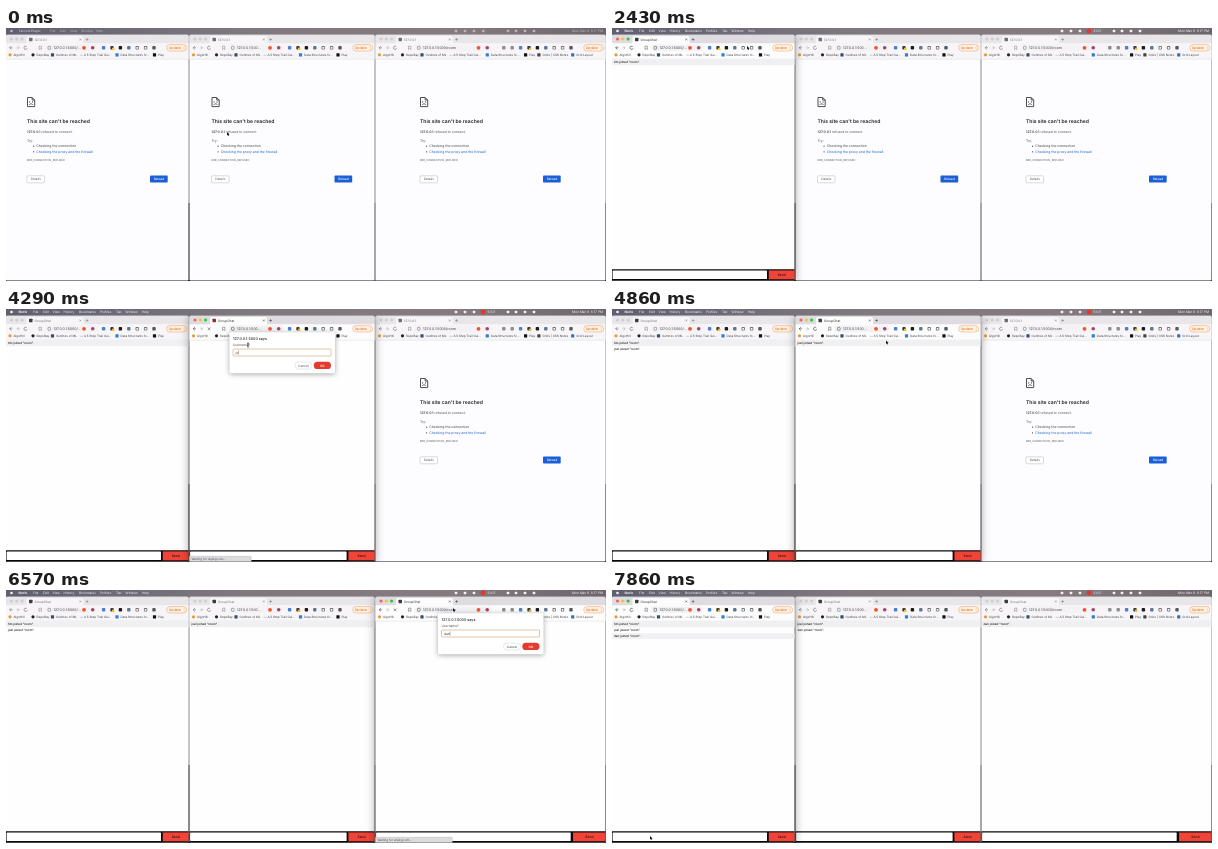
Recreate the animation shown at these times as an HTML page with a canvas. Size 600 by 253 pixels, loop 8000 ms.

```html
<!DOCTYPE html>
<html lang="en">
<head>
<meta charset="utf-8">
<title>Group chat demo</title>
<style>
html, body { margin: 0; width: 100%; height: 100%; overflow: hidden; background: #fff; }
canvas { display: block; width: 600px; height: 253px; }
</style>
</head>
<body>
<canvas id="stage"></canvas>
<script>
const W = 600, H = 253, LOOP = 8000, STEPS = 56, TOP = 6.4, BOTTOM = 252.4;
const SANS = 'Inter, "Liberation Sans", sans-serif';
const canvas = document.getElementById('stage');
const ctx = canvas.getContext('2d');
const scale = window.devicePixelRatio || 1;
canvas.width = Math.round(W * scale);
canvas.height = Math.round(H * scale);
// Keeps fractional glyph spacing in very small type.
ctx.textRendering = 'geometricPrecision';

// All event times are counted in steps of one loop.
const windows = [
  { x: 0, r: 182.5, page: 21, url: '127.0.0.1:5000/...', name: 'tim', busy: '#3a3d40',
    chat: 5, ask: 6, type: 10, join: 14, select: [-1, -1], marks: 6, tools: 7 },
  { x: 183.5, r: 368.5, page: 205.5, url: '127.0.0.1:500...', name: 'joel', busy: '#8d2e2a',
    chat: 26, ask: 27, type: 29, join: 33, select: [20, 25], marks: 6, tools: 7 },
  { x: 369.5, r: 599.5, page: 414, url: '127.0.0.1:5000/room', name: 'dan', busy: '#3a3d40',
    chat: 42, ask: 43, type: 44, join: 48, select: [37, 41], marks: 8, tools: 9 }
];
const focus = [[0, -1], [3, 0], [18, 1], [35, 2], [50, 0]];
const pointer = [
  [0, 221, 104], [2, 221, 104], [6, 20, 18], [15, 20, 18], [19, 250, 18],
  [26, 250, 18], [28, 242, 34], [33, 242, 34], [37, 447, 18], [47, 447, 18], [53, 38, 246]
];
const bookmarks = [
  [4, '#e79a32', 'AlgoHill'], [27, '#222', 'RepoBay'], [46.5, '#34506b', 'Outlines of ML'],
  [74, '', '— A 5 Step Trail Gui...'], [111, '#2f7fd0', 'Data Structures fo...'],
  [148.5, '#111', 'Play'], [161, '#444', 'Grids | CSS Notes'], [194, '#3b6fb5', 'Grid Layout']
];
// Toolbar button colours, from the right edge inwards.
const toolColors = ['#55585c', '#6f7276', '#6f7276', '#5c7690', '#1b1b1b', '#3c3c3c',
  '#4b7fd6', '#8a8d91', '#8a8d91'];

function box(x, y, w, h, fill, radius = 0, stroke) {
  ctx.beginPath();
  ctx.roundRect(x, y, w, h, radius);
  if (fill) { ctx.fillStyle = fill; ctx.fill(); }
  if (stroke) { ctx.strokeStyle = stroke; ctx.lineWidth = 0.5; ctx.stroke(); }
}

function shadowBox(x, y, w, h, fill, radius, blur, alpha) {
  ctx.save();
  ctx.shadowColor = `rgba(0,0,0,${alpha})`;
  ctx.shadowBlur = blur * scale;
  ctx.shadowOffsetY = scale;
  box(x, y, w, h, fill, radius);
  ctx.restore();
}

function dot(x, y, r, fill) {
  ctx.fillStyle = fill;
  ctx.beginPath();
  ctx.arc(x, y, r, 0, 7);
  ctx.fill();
}

function path(points, color, width = 0.6) {
  ctx.strokeStyle = color;
  ctx.lineWidth = width;
  ctx.beginPath();
  points.forEach(([x, y], i) => i ? ctx.lineTo(x, y) : ctx.moveTo(x, y));
  ctx.stroke();
}

function text(str, x, y, size, color = '#333', weight = 400, align = 'left') {
  ctx.font = `${weight} ${size}px ${SANS}`;
  ctx.fillStyle = color;
  ctx.textAlign = align;
  ctx.fillText(str, x, y);
}

function cross(x, y, r, color) {
  path([[x - r, y - r], [x + r, y + r]], color, 0.5);
  path([[x - r, y + r], [x + r, y - r]], color, 0.5);
}

function menuBar(n) {
  const g = ctx.createLinearGradient(0, 0, W, 0);
  g.addColorStop(0, '#5f5f70');
  g.addColorStop(0.4, '#80787f');
  g.addColorStop(0.75, '#857b7f');
  g.addColorStop(1, '#6c656d');
  box(0, 0, W, TOP, g);
  const app = n >= 3;
  const color = app ? '#f6f3f4' : '#bdb5b8';
  dot(5.5, 3, 1.3, color);
  if (app) {
    text('Norlo', 12.5, 4.3, 3.3, color, 700);
    const items = [['File', 27], ['Edit', 37], ['View', 46.5], ['History', 57.5],
      ['Bookmarks', 73], ['Profiles', 94], ['Tab', 110], ['Window', 119.5], ['Help', 136]];
    items.forEach(([s, x]) => text(s, x, 4.3, 3.2, color));
  } else {
    text('Tarnvid Player', 12.5, 4.3, 3.2, color, 700);
    ['File', 'Edit', 'View', 'Window', 'Help'].forEach((s, i) =>
      text(s, [44, 54, 64, 75, 90][i], 4.3, 3.2, color));
  }
  for (const x of [450, 459, 468, 502, 510, 519, 528]) box(x - 1.3, 1.7, 2.6, 2.6, color, 0.8);
  if (app) {
    dot(477, 3, 2.4, '#e3362e');
    text('51:07', 481.5, 4.3, 3.2, color);
  } else {
    box(476, 1.7, 2.6, 2.6, color, 0.8);
  }
  text('Mon Mar 8  6:17 PM', 597, 4.3, 3.3, color, 400, 'right');
}

function tabStrip(w, n, active, loading) {
  const { x, r } = w;
  const ink = active ? '#333' : '#70747a';
  const loaded = n >= w.chat;
  box(x, TOP, r - x, 15.5 - TOP, active ? '#dedce0' : '#e8e6e9', [2, 2, 0, 0]);
  ['#fe5f57', '#febc2e', '#28c840'].forEach((c, i) =>
    dot(x + 5.5 + i * 5.3, 11, 1.6, active ? c : '#cfcdd1'));
  box(x + 20.5, 8, 57, 8, active ? '#fdfcfd' : '#f7f5f8', [2, 2, 0, 0]);
  const icon = loading ? w.busy : '#3a3d40';
  box(x + 23, 9.7, 3.5, 3.5, loaded ? icon : '#6e7277', 0.6);
  text(loaded ? 'GroupChat' : '127.0.0.1', x + 28.5, 12.7, 3.2, ink);
  cross(x + 74.3, 11.5, 0.9, ink);
  path([[x + 79.7, 11.5], [x + 82.5, 11.5]], ink, 0.5);
  path([[x + 81.1, 10.1], [x + 81.1, 12.9]], ink, 0.5);
}

function toolbar(w, n, active, loading) {
  const { x, r } = w;
  const ink = active ? '#333' : '#5f6368';
  box(x, 15.5, r - x, 15.7, active ? '#fdfcfd' : '#f7f5f8');
  path([[x + 5.3, 18.2], [x + 3.7, 19.8], [x + 5.3, 21.4]], ink);
  path([[x + 3.7, 19.8], [x + 6.5, 19.8]], ink, 0.5);
  path([[x + 11.6, 18.2], [x + 13.2, 19.8], [x + 11.6, 21.4]], '#a9acb0');
  path([[x + 10.4, 19.8], [x + 13.2, 19.8]], '#a9acb0', 0.5);
  if (loading) cross(x + 19.6, 19.8, 1.3, ink);
  else {
    ctx.strokeStyle = ink;
    ctx.lineWidth = 0.6;
    ctx.beginPath();
    ctx.arc(x + 19.6, 19.8, 1.6, 0.3, 5.5);
    ctx.stroke();
  }
  path([[x + 33, 18.2], [x + 33, 21.5], [x + 34.2, 20.5], [x + 35.4, 21.5],
    [x + 35.4, 18.2], [x + 33, 18.2]], ink, 0.4);

  const barEnd = w.marks > 6 ? 485 : r - 92;
  box(x + 39.5, 16.6, barEnd - x - 39.5, 6.5, active ? '#f2f1f3' : '#f4f2f5', 1.5);
  const selected = n >= w.select[0] && n < w.select[1];
  ctx.font = `400 3.5px ${SANS}`;
  if (selected) box(x + 47, 17.3, ctx.measureText(w.url).width + 1, 5, '#b9d3ae');
  box(x + 42, 18.3, 2.6, 3, '', 0.6, ink);
  text(w.url, x + 47.5, 21.1, 3.5, selected ? '#183b18' : '#36393d');
  dot(barEnd - 12.5, 19.8, 1.9, '#f0532d');
  dot(barEnd - 3.8, 19.8, 1.8, '#a34468');

  toolColors.slice(0, w.tools).forEach((c, i) => {
    const tx = r - 34.5 - i * 8.4;
    box(tx - 1.7, 18.1, 3.4, 3.4, c, 0.8);
    if (c === '#3c3c3c') box(tx, 19.8, 2.4, 2.3, '#f2c02e', 0.3);
    if (c === '#6f7276') box(tx - 0.9, 18.9, 1.8, 1.8, '#fff', 0.5);
  });
  box(r - 21.8, 16.6, 20, 6.4, '#fff3e7', 3.2, '#f09b55');
  text('Update', r - 19.8, 21, 3.5, '#df7820', 500);
  [18.5, 19.8, 21.1].forEach(y => dot(r - 4.4, y, 0.35, '#df7820'));

  bookmarks.slice(0, w.marks).forEach(([bx, color, label], i) => {
    const px = x + bx + (w.marks > 6 ? Math.max(0, i - 3) * 0.8 : 0);
    if (color) i < 2 ? dot(px, 26.8, 1.6, color) : box(px - 1.6, 25.2, 3.2, 3.2, color, 0.5);
    text(label, px + (color ? 3.5 : 0), 27.9, 3.05, '#3f4246');
  });
  path([[x, 31.2], [r, 31.2]], '#d9d7db', 0.5);
}

function sadPage(x, y) {
  const c = '#4c4f53';
  path([[x + 5.2, y + 0.5], [x + 0.5, y + 0.5], [x + 0.5, y + 9.6], [x + 7.7, y + 9.6],
    [x + 7.7, y + 3], [x + 5.2, y + 0.5], [x + 5.2, y + 3], [x + 7.7, y + 3]], c, 1);
  dot(x + 2.6, y + 4.9, 0.6, c);
  dot(x + 5.5, y + 4.9, 0.6, c);
  path([[x + 2.2, y + 7.9], [x + 3.1, y + 6.9], [x + 5.1, y + 6.9], [x + 6, y + 7.9]], c, 0.8);
}

function errorPage(x) {
  sadPage(x, 69);
  text("This site can't be reached", x, 95.4, 5.05, '#202124', 600);
  text('127.0.0.1', x, 104.7, 3.4, '#3c4043', 600);
  const hostWidth = ctx.measureText('127.0.0.1').width;
  text(' refused to connect.', x + hostWidth, 104.7, 3.4, '#4c5054');
  text('Try:', x, 113.8, 3.4, '#4c5054');
  dot(x + 6.6, 118.2, 0.6, '#3c4043');
  dot(x + 6.6, 123.8, 0.6, '#3c4043');
  text('Checking the connection', x + 9.2, 119.4, 3.4, '#3c4043');
  text('Checking the proxy and the firewall', x + 9.2, 125, 3.4, '#1a62d6');
  text('ERR_CONNECTION_REFUSED', x, 133.3, 2.7, '#5a5e63');
  box(x, 147.8, 17.5, 7, '#fff', 0.8, '#b4b7bb');
  text('Details', x + 8.75, 152.4, 3.2, '#4c5054', 400, 'center');
  box(x + 123, 147.6, 17.7, 7, '#1a5fd6', 0.8);
  text('Reload', x + 131.9, 152.3, 3.2, '#fff', 500, 'center');
}

function chatPage(w, n) {
  const width = w.r - w.x;
  windows.filter(o => o.join >= w.join && n >= o.join).forEach((o, i) => {
    const y = 31.4 + i * 5.9;
    if (i % 2 === 0) box(w.x, y, width, 5.9, '#f0eff1');
    text(`${o.name} joined "room".`, w.x + 2, y + 3.9, 3, '#151515', 500);
  });
  box(w.x, 241.3, width, BOTTOM - 241.3, '#080808');
  box(w.x + 0.6, 242.6, width * 0.846, 8.4, '#fff', 0.6);
  box(w.x + width * 0.859, 242.4, width * 0.141, 8.9, '#f04438');
  text('Send', w.x + width * 0.93, 248, 3.3, '#2a0c0a', 500, 'center');
}

function prompt(w, n) {
  if (n > w.chat && n < w.join) {
    box(w.x, 247.3, (w.r - w.x) / 3, 5.1, '#dcdbde', [0, 1, 0, 0], '#b9b8bb');
    text('Waiting for unpkg.com...', w.x + 2, 251, 3, '#4a4d50');
  }
  const x = (w.x + w.r) / 2 - 52.5;
  shadowBox(x, 23.3, 105.5, 41, '#fff', 1.5, 5, 0.35);
  text('127.0.0.1:5000 says', x + 3.5, 30.6, 3.7, '#202124', 500);
  text('Username?', x + 3.5, 37.1, 3.2, '#44484c');
  box(x + 3.5, 40, 98, 7, '#fff', 0.8, '#c58a52');
  const typed = w.name.slice(0, Math.max(0, n - w.type + 1));
  text(typed, x + 6, 44.7, 3.2, '#333');
  const caret = x + 6.3 + ctx.measureText(typed).width;
  path([[caret, 41.5], [caret, 45.5]], '#333', 0.4);
  box(x + 65.5, 53, 17, 7, '#fff', 3.5, '#cfd1d4');
  text('Cancel', x + 74, 57.6, 3.1, '#55595d', 500, 'center');
  box(x + 84.3, 52.8, 17.2, 7.3, '#e33b2d', 3.65);
  text('OK', x + 92.9, 57.6, 3.1, '#fff', 600, 'center');
}

function drawWindow(w, n, active) {
  const loaded = n >= w.chat;
  const loading = n >= w.chat - 1 && n < w.join;
  const page = loaded ? '#fefefe' : '#fdfcfe';
  shadowBox(w.x, TOP, w.r - w.x, BOTTOM - TOP, page, [2, 2, 1, 1], active ? 10 : 0, active ? 0.4 : 0);
  tabStrip(w, n, active, loading);
  toolbar(w, n, active, loading);
  if (loaded) chatPage(w, n);
  else errorPage(w.page);
  if (n >= w.ask && n < w.join) prompt(w, n);
}

function drawPointer(n) {
  const next = pointer.findIndex(p => p[0] > n);
  const a = pointer[next < 0 ? pointer.length - 1 : next - 1];
  const b = next < 0 ? a : pointer[next];
  const k = b === a ? 0 : (n - a[0]) / (b[0] - a[0]);
  const e = k * k * (3 - 2 * k);
  const x = a[1] + (b[1] - a[1]) * e, y = a[2] + (b[2] - a[2]) * e;
  if (n >= 28 && n < 34) {
    path([[x, y], [x, y + 4]], '#111', 0.7);
    path([[x - 0.9, y], [x + 0.9, y]], '#111', 0.5);
    path([[x - 0.9, y + 4], [x + 0.9, y + 4]], '#111', 0.5);
    return;
  }
  ctx.beginPath();
  [[0, 0], [0, 3.6], [0.8, 2.9], [1.4, 4.1], [2, 3.8], [1.5, 2.7], [2.6, 2.6]]
    .forEach(([px, py]) => ctx.lineTo(x + px, y + py));
  ctx.closePath();
  ctx.fillStyle = '#111';
  ctx.strokeStyle = '#fff';
  ctx.lineWidth = 0.6;
  ctx.stroke();
  ctx.fill();
}

function draw(n) {
  ctx.setTransform(scale, 0, 0, scale, 0, 0);
  // Desktop seen through the gaps between windows.
  box(0, 0, W, 175, '#8b898d');
  box(0, 175, W, H - 175, '#161616');
  box(368.5, 175, 1, H - 175, '#8b898d');
  const front = windows[focus.filter(f => f[0] <= n).pop()[1]];
  windows.filter(w => w !== front).forEach(w => drawWindow(w, n, false));
  if (front) drawWindow(front, n, true);
  menuBar(n);
  drawPointer(n);
}

function tick(now) {
  const t = now % LOOP;
  draw(Math.min(STEPS - 1, Math.floor((t + 3) * STEPS / LOOP)));
  requestAnimationFrame(tick);
}
requestAnimationFrame(tick);
</script>
</body>
</html>
```
